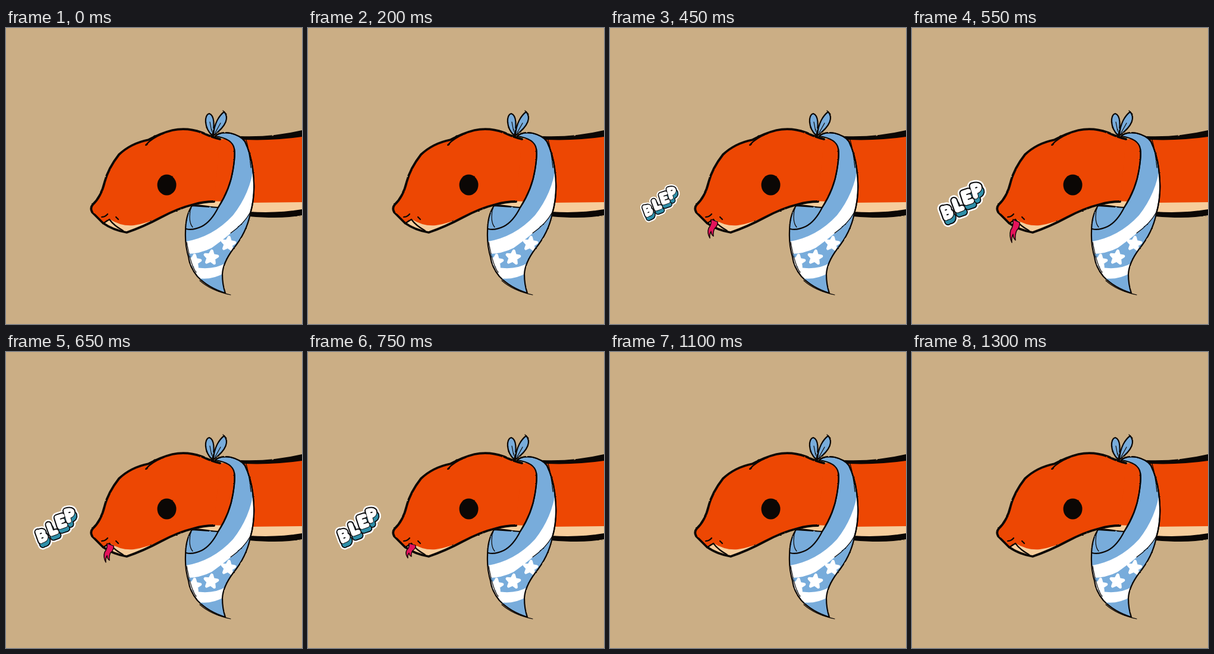
An HTML page for the animation above (1350 ms loop, 498x498 px).

```html
<!DOCTYPE html>
<html lang="en">
<head>
<meta charset="utf-8">
<title>Blep</title>
<style>
  html, body { margin: 0; width: 100%; height: 100%; overflow: hidden; background: #cbae85; }
  svg { display: block; width: 100%; height: 100%; }
  .ink { fill: none; stroke: #0b0705; stroke-width: 3.8; stroke-linecap: round; stroke-linejoin: round; }
  .thin { stroke-width: 2.2; }
  .hair { stroke-width: 1.2; }
  .solid { fill: #0b0705; }
  .skin { fill: #ed4703; }
  .cream { fill: #f6cd9c; }
  .cloth { fill: #78acdb; }
  .white { fill: #fff; }
  #star { fill: #fff; stroke: #fff; stroke-width: 5; stroke-linejoin: round; }
  #word { fill: none; stroke-linecap: round; stroke-linejoin: round; }
</style>
</head>
<body>
<svg viewBox="0 0 498 498">
  <defs>
    <filter id="rough" filterUnits="userSpaceOnUse" x="0" y="0" width="498" height="498" color-interpolation-filters="sRGB">
      <feTurbulence type="fractalNoise" baseFrequency=".15" numOctaves="2" seed="4"/>
      <feDisplacementMap in="SourceGraphic" scale="1.800" xChannelSelector="R" yChannelSelector="G"/>
    </filter>
    <path id="head" d="M360 187Q344 183 330 176Q305 167 280 172Q260 177 240 188Q210 194 190 213Q172 236 166 259Q160 284 146 297Q141 303 145 310L163 328Q180 340 203 344Q232 334 260 319Q290 303 315 297Q333 292 350 292"/>
    <path id="scarf" d="M352 182Q360 174 378 177Q395 181 402 191Q412 212 415 236Q421 278 411 312Q405 344 382 372Q365 395 364 414Q364 432 369 446Q340 437 322 418Q309 402 307 385Q301 365 302 342Q302 315 313 299L357 302Q377 270 382 238Q386 214 384 203Q381 186 352 182Z"/>
    <path id="knot" d="M347 181C333 168 333 146 342 144C351 147 351 165 347 181ZM349 181C350 160 359 147 367 141C375 150 372 164 349 181Z"/>
    <clipPath id="inScarf"><use href="#scarf"/></clipPath>
    <path id="star"/>
    <g id="letters">
      <path transform="translate(60 309) rotate(-20)" d="M-4-8V8M-4-7Q6-8 4-3Q2 0-3 0Q7 0 5 5Q3 9-4 7"/>
      <path transform="translate(77 297) rotate(-20)" d="M-3-8V8H5"/>
      <path transform="translate(92 285) rotate(-18)" d="M5-8H-4V8H5M-4 0H3"/>
      <path transform="translate(107 274) rotate(-16)" d="M-4 9V-8Q7-8 5-2Q3 2-4 1"/>
    </g>
    <g id="slits">
      <path transform="translate(60 309) rotate(-20)" d="M-1-4h2M-1 4h2"/>
      <path transform="translate(92 285) rotate(-18)" d="M1-4h7M1 4h7"/>
      <path transform="translate(107 274) rotate(-16)" d="M0-4h2"/>
    </g>
  </defs>

  <rect width="498" height="498" fill="#cbae85"/>

  <path class="skin" d="M345 187H400L498 178V310L412 313L345 293Z"/>
  <use href="#head" class="skin"/>
  <path class="cream" d="M164 329L175 322Q194 334 215 332Q240 328 262 317Q230 336 203 343Q178 340 164 329ZM318 297Q335 290 368 292L355 304ZM408 294L498 293V310Q455 314 408 313Z"/>

  <g filter="url(#rough)">
    <use href="#head" class="ink"/>
    <path class="ink thin" d="M235 197Q244 186 266 177M163 329L174 322Q181 332 197 341M161 318Q167 318 171 313M185 318L189 322M318 298Q340 299 356 304"/>
    <path class="solid" d="M394 182Q447 184 498 172V183Q450 190 400 188ZM409 309Q456 312 498 305V315Q465 322 409 317Z"/>
    <ellipse class="solid" cx="270.500" cy="264" rx="16" ry="17.500"/>
  </g>

  <use href="#scarf" class="cloth"/>
  <g clip-path="url(#inScarf)">
    <path class="white" d="M417 232Q411 278 382 315Q347 353 298 360V380Q325 381 346 370Q378 347 390 334Q406 322 413 305L424 280ZM300 399Q345 411 370 395L368 412Q340 428 310 418Z"/>
    <use href="#star" x="374" y="363"/>
    <use href="#star" x="345" y="386"/>
    <use href="#star" x="316" y="393"/>
  </g>
  <use href="#knot" class="cloth"/>
  <g filter="url(#rough)">
    <use href="#knot" class="ink thin"/>
    <use href="#scarf" class="ink thin"/>
    <path class="ink thin" d="M384 203Q386 214 382 238Q377 272 357 302Q345 326 329 334Q314 341 303 338M352 182Q360 174 378 177Q395 181 402 191Q412 212 415 236Q421 278 411 312"/>
    <path class="ink hair" d="M311 302Q306 326 314 335M411 310Q400 330 378 345M404 188Q409 205 412 235M304 360Q311 400 320 411M326 425Q345 442 378 449M343 158L346 174M361 160L352 176M365 139L371 145"/>
  </g>

  <path id="tongue" d="M170 322L181 327Q182 335 176 341Q173 348 174 357Q170 353 170 347Q167 353 168 361Q163 350 166 340Q171 333 170 322Z" fill="#e4135b" stroke="#160608" stroke-width="1.500" stroke-linejoin="round"/>

  <g id="word" role="img" aria-label="BLEP">
    <g stroke="#fff" stroke-width="17"><use href="#letters"/><use href="#letters" x="3" y="6"/></g>
    <g stroke="#0b0b0d" stroke-width="12"><use href="#letters"/><use href="#letters" x="3" y="6"/></g>
    <use href="#letters" x="3" y="6" stroke="#2f8fa9" stroke-width="8.500"/>
    <use href="#letters" stroke="#0b0b0d" stroke-width="10"/>
    <use href="#letters" stroke="#fff" stroke-width="8"/>
    <use href="#slits" stroke="#0b0b0d" stroke-width="1.800"/>
  </g>
</svg>
<script>
  const LOOP = 1350, STEP = 50;
  const START = 300, PEAK = 550, END = 1100;
  const $ = id => document.getElementById(id);
  const ramp = (t, from, to) => Math.min(1, Math.max(0, (t - from) / (to - from)));
  const easeOut = p => Math.sin(p * Math.PI / 2);

  const points = Array.from({ length: 10 }, (_, i) => {
    const r = i % 2 ? 5 : 11, a = i * Math.PI / 5 - 1.45;
    return `${r * Math.cos(a)} ${r * Math.sin(a)}`;
  });
  $('star').setAttribute('d', `M${points.join('L')}Z`);

  function scaleAbout(el, x, y, sx, sy) {
    el.style.display = sy > 0 ? '' : 'none';
    el.setAttribute('transform', `translate(${x} ${y}) scale(${sx} ${sy}) translate(${-x} ${-y})`);
  }

  function draw() {
    const t = Math.floor(performance.now() % LOOP / STEP) * STEP;
    const out = easeOut(ramp(t, START, PEAK));
    const tongue = out * (1 - ramp(t, PEAK, END));
    const overshoot = 1.06 - .06 * ramp(t, PEAK, PEAK + 100);
    const word = out * overshoot * (1 - ramp(t, 950, END));
    scaleAbout($('tongue'), 175, 322, 1, tongue);
    scaleAbout($('word'), 85, 294, word, word);
    requestAnimationFrame(draw);
  }
  draw();
</script>
</body>
</html>
```
